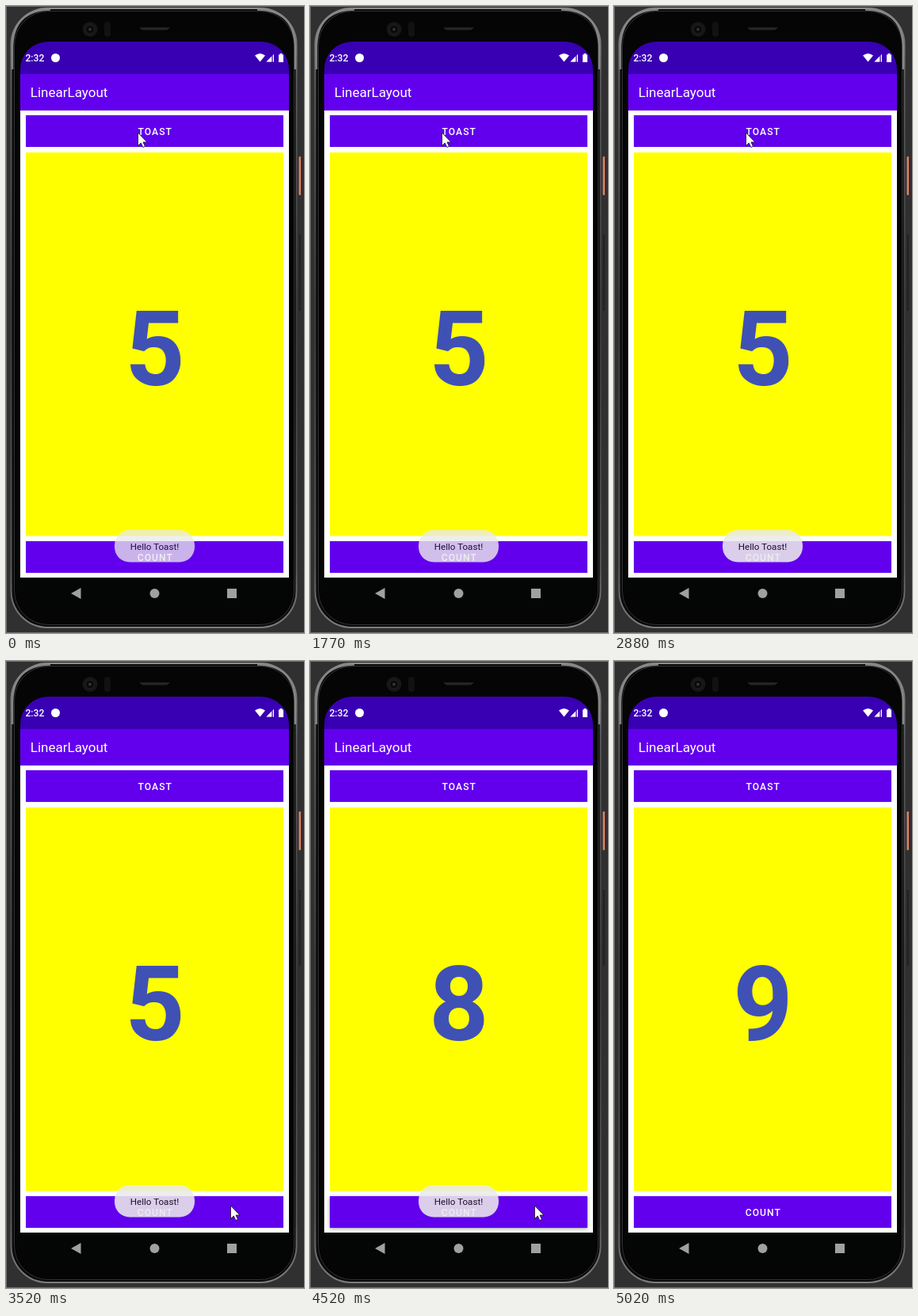
These frames come from a looping animation (376 px wide and 792 px high, 5.39 s). An HTML page:

```html
<!DOCTYPE html>
<html lang="en">
<head>
<meta charset="utf-8">
<title>LinearLayout counter</title>
<style>
  html, body { margin: 0; width: 100%; height: 100%; overflow: hidden; background: #303030; }
  svg { display: block; width: 376px; height: 792px; }
  text { font-family: Roboto, sans-serif; }
  .label { font-size: 12.1px; font-weight: 500; letter-spacing: 1.05px; fill: #fff; text-anchor: middle; }
  #digit { font-size: 131.5px; font-weight: 700; fill: #3f51b5; text-anchor: middle; }
</style>
</head>
<body>
<svg viewBox="0 0 376 792">
  <defs>
    <linearGradient id="rim" x1="0" y1="0" x2="0" y2="1">
      <stop offset="0" stop-color="#8b8d8d"/>
      <stop offset=".12" stop-color="#5a5c5c"/>
      <stop offset=".5" stop-color="#3a3b3b"/>
      <stop offset=".9" stop-color="#585a5a"/>
      <stop offset="1" stop-color="#7c7e7e"/>
    </linearGradient>
    <clipPath id="screen"><rect x="18" y="45" width="339" height="717" rx="35"/></clipPath>
  </defs>

  <!-- phone body -->
  <rect width="376" height="792" fill="#303030"/>
  <path d="M0 .5H376M.5 0V792M0 791.5H376" stroke="#6c6c6c"/>
  <rect x="369.5" y="190" width="2.5" height="49" rx="1" fill="#e27d69"/>
  <rect x="369.5" y="289" width="2.500" height="96" rx="1" fill="#222"/>
  <rect x="6.5" y="3" width="360" height="782" rx="46" fill="#0a0a0a" stroke="url(#rim)" stroke-width="2"/>
  <rect x="10.500" y="6.500" width="353" height="775" rx="43" fill="#050505" stroke="#303131"/>
  <path d="M8 80V52Q9 5 56 4.500M365 80V52Q364 5 317 4.500" fill="none" stroke="#858787" stroke-width="2.500"/>
  <circle cx="106" cy="29.500" r="9.500" fill="#161616"/>
  <circle cx="106" cy="29.500" r="5.500" fill="#0a0a0a" stroke="#242424"/>
  <circle cx="106" cy="29.500" r="2" fill="#303238"/>
  <rect x="124" y="20" width="8" height="19" rx="4" fill="#121212"/>
  <path d="M168 27H207L203 30.500H172Z" fill="#242424"/>

  <g clip-path="url(#screen)">
    <rect x="18" y="45" width="339" height="717" fill="#040606"/>
    <rect x="18" y="45" width="339" height="41" fill="#3900b3"/>
    <rect x="18" y="86" width="339" height="46" fill="#6200ee"/>
    <rect x="18" y="132" width="339" height="590" fill="#fff"/>
  </g>

  <!-- status bar and title -->
  <g fill="#fff">
    <text x="24.500" y="70" font-size="12.1" font-weight="500">2:32</text>
    <circle cx="62.500" cy="65.500" r="5.500"/>
    <path d="M314 62.500Q320.500 57.500 327 62.500L320.500 70.500Z"/>
    <path d="M328.500 70.500L338 60.500V70.500Z" opacity=".35"/>
    <path d="M328.500 70.500L335 63.700V70.500ZM337 61.500H338V70.500H337Z"/>
    <path d="M344 61.500H345.500V60H348.500V61.500H350V71H344Z"/>
    <text x="30.800" y="115" font-size="17">LinearLayout</text>
  </g>

  <!-- navigation -->
  <g fill="#a0a0a0">
    <path d="M82 742L94.500 735V749Z"/>
    <circle cx="187.500" cy="742" r="6"/>
    <rect x="279" y="736" width="12" height="12"/>
  </g>

  <rect id="toastBtn" x="25" y="138" width="325" height="40" fill="#6200ee"/>
  <rect id="countBtn" x="25" y="676" width="325" height="40" fill="#6200ee"/>
  <text class="label" x="188.300" y="163">TOAST</text>
  <text class="label" x="188.300" y="700.500">COUNT</text>
  <rect x="25" y="185" width="325" height="484.500" fill="#ff0"/>
  <text id="digit" x="188" y="479.300">5</text>

  <g id="toast">
    <rect x="137" y="662" width="101" height="40.500" rx="19" fill="#ebebeb"/>
    <text x="187.500" y="687" font-size="11.6" fill="#111" text-anchor="middle">Hello Toast!</text>
  </g>

  <path id="cursor" d="M0 0V16.500L3.800 13L6.300 18.500L9 17.300L6.500 12H11.500Z"
        fill="#fff" stroke="#111" stroke-width=".8"/>
</svg>
<script>
const LOOP = 5390, FRAME = 120, CLICK = 240;
const $ = id => document.getElementById(id);
const clamp = (v, lo, hi) => Math.min(hi, Math.max(lo, v));

// Progress 0..1 in n jumps, the first one at the start time.
const stepped = (t, start, n) => clamp(Math.floor((t - start) / FRAME) + 1, 0, n) / n;

const fade = (t, shown, hidden) =>
  Math.sin(stepped(t, shown, 3) * Math.PI / 2) * Math.cos(stepped(t, hidden, 4) * Math.PI / 2);

const press = (t, from, to) => Math.sin(clamp((t - from) / (to - from), 0, 1) * Math.PI);

function lift(id, amount) {
  const e = 1 + 2 * amount;
  $(id).style.filter = `drop-shadow(0 ${e * .6}px ${e * .7}px rgba(0,0,0,.4))`;
}

function pointer(t) {
  const travel = 1 - (1 - stepped(t, 3000, 3)) ** 3;
  const nudge = stepped(t, 3520, 1);
  const leave = stepped(t, 4780, 3) ** 2;
  return [166.5 + 114 * travel + 3 * nudge + 20 * leave,
          160 + 516 * travel + 12 * nudge + 115 * leave];
}

function draw(now) {
  const t = now % LOOP;
  $('digit').textContent = 5 + clamp(Math.floor((t - 3800) / CLICK), 0, 4);
  $('toast').setAttribute('opacity', .88 * (fade(t, -FRAME, 1770) + fade(t, 2640, 4660)));
  lift('toastBtn', press(t, 2400, 2880));
  lift('countBtn', press(t, 3700, 4060) + press(t, 4200, 4850));
  $('cursor').setAttribute('transform', `translate(${pointer(t)})`);
  requestAnimationFrame(draw);
}
draw(performance.now());
</script>
</body>
</html>
```
